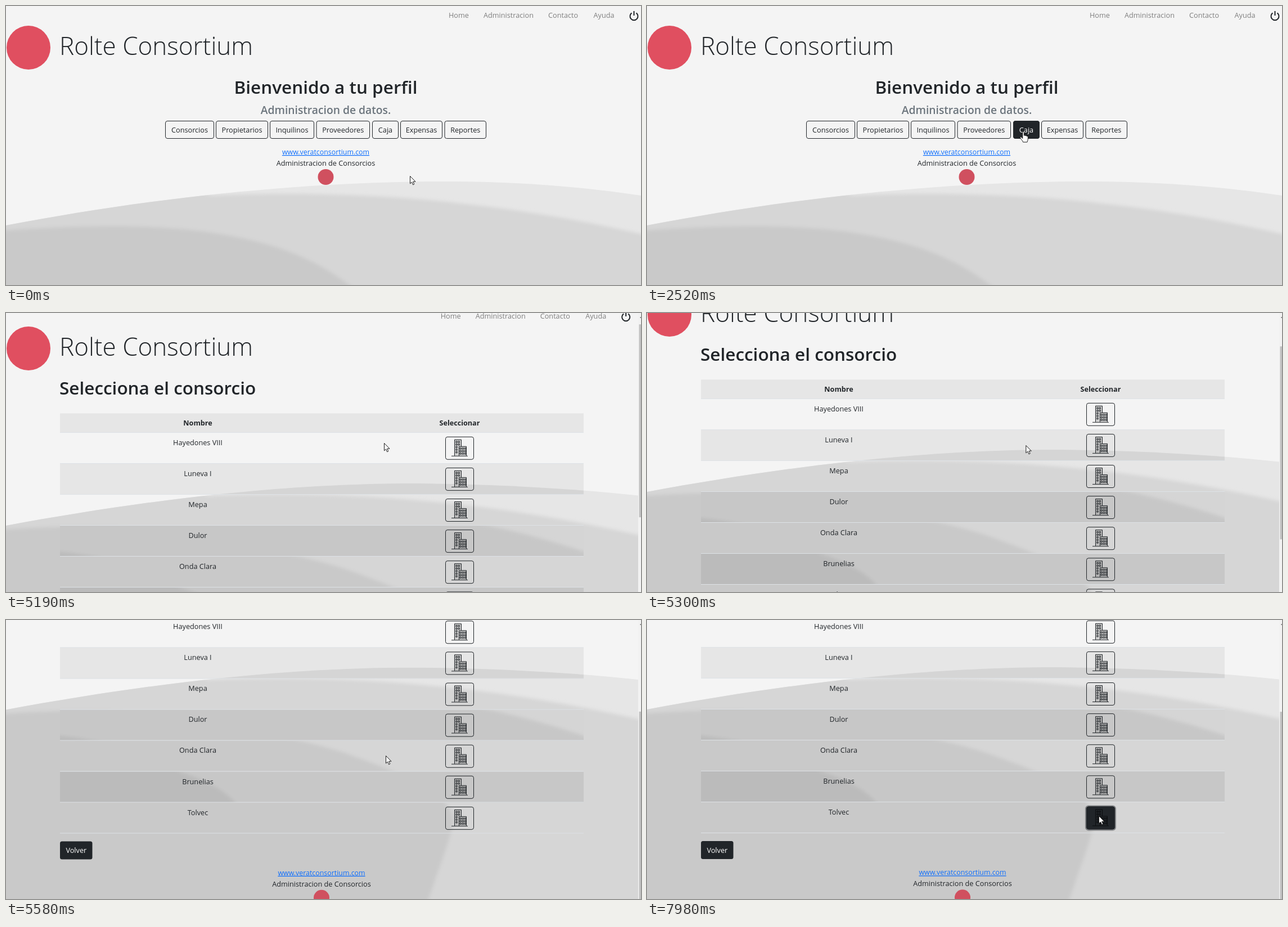
Animation of 1129 by 496 pixels, one loop 8000 ms. Source, as an HTML page:

```html
<!DOCTYPE html>
<html lang="es">
<head>
<meta charset="utf-8">
<title>Consorcios</title>
<style>
html, body { margin: 0; width: 100%; height: 100%; overflow: hidden; background: #f4f4f4; }
svg { display: block; width: 100vw; height: 100vh;
  --light: #e6e6e6; --mid: #d6d6d6; --dark: #c9c9c9; --rowHill: #d5d5d5; --rowMid: #c7c7c7; }
svg.flat { --mid: #cdcdcd; --dark: #cdcdcd; --rowHill: #cbcbcb; --rowMid: #cdcdcd; }
text { font: 12.7px "Open Sans", "Noto Sans", sans-serif; fill: #212529; }
.mid { text-anchor: middle; }
.nav { fill: #7f7f7f; }
.brand { font-size: 44px; font-weight: 300; }
.h1 { font-size: 31.5px; font-weight: 600; }
.sub { font-size: 19.3px; font-weight: 600; fill: #6c757d; }
.link { font-size: 12.4px; fill: #0d6efd; text-decoration: underline; }
.th { font-size: 12.6px; font-weight: 700; }
.on { fill: #fff; }
.btn { fill: none; stroke: #212529; }
.solid { fill: #212529; stroke: #212529; }
.ink { fill: none; stroke: #212529; }
.cursor { fill: #fff; stroke: #1b1b1b; stroke-linejoin: round; }
</style>
</head>
<body>
<svg id="stage" viewBox="0 0 1129 496" preserveAspectRatio="none"></svg>
<script>
const stage = document.getElementById('stage');
const LOOP = 8000;
const ROW = 55.1;
const names = ['Hayedones VIII', 'Luneva I', 'Mepa', 'Dulor', 'Onda Clara', 'Brunelias', 'Tolvec'];
const rowY = i => 223.5 + ROW * i;

const text = (x, y, s, cls = '') => `<text x="${x}" y="${y}" class="${cls}">${s}</text>`;
const rect = (x, y, w, h, extra) => `<rect x="${x}" y="${y}" width="${w}" height="${h}" ${extra}/>`;
const fill = (d, color) => `<path d="${d}" fill="${color}"/>`;

// Hill silhouette with softly edged darker bands inside.
const hills = (clip, base, mid, midColor, dark, darkColor) => `
  <g clip-path="url(#${clip})">
    ${rect(0, 290, 1129, 460, `fill="${base}"`)}
    <g filter="url(#soft)">${fill(mid, midColor)}${fill(dark, darkColor)}</g>
  </g>`;

const header = dx => {
  const items = [[787, 'Home'], [849, 'Administracion'], [964, 'Contacto'], [1044.5, 'Ayuda']];
  return items.map(([x, s]) => text(x + dx, 21, s, 'nav')).join('') +
    `<path class="ink" stroke-width="2" transform="translate(${1116.5 + dx} 18)"
      d="M-4-5.6A7 7 0 1 0 4-5.6M0-9V-1"/>
    <circle cx="40" cy="74" r="39" fill="#e04f60"/>` +
    text(95, 87, 'Rolte Consortium', 'brand');
};

const footer = (x, y) =>
  text(x, y, 'www.veratconsortium.com', 'link mid') +
  text(x, y + 20, 'Administracion de Consorcios', 'mid') +
  `<circle cx="${x}" cy="${y + 40}" r="14" fill="#d0505f"/>`;

const button = (x, w, s, on) =>
  rect(x + .5, 204.5, w - 1, 31, `rx="3.5" class="${on ? 'solid' : 'btn'}"`) +
  text(x + w / 2, 224.6, s, on ? 'mid on' : 'mid');

const windows = (x, y, cols, rows) => {
  let d = '';
  for (let r = 0; r < rows; r++)
    for (let c = 0; c < cols; c++) d += `M${x + c * 4.2} ${y + r * 4.6}h2.4v2.4h-2.4z`;
  return d;
};
const buildingPath = `M16.5 34V5.5H28.5V17.5M24.5 34V17.5H37.5V34M11 34.5H40` +
  windows(18.8, 8.2, 2, 2) + windows(18.8, 17.4, 1, 3) + windows(26, 20, 3, 2) + windows(26, 29, 3, 1);
const building = i => `<g transform="translate(781 ${rowY(i) + 7.3})">
  ${rect(.5, .5, 50, 40, 'rx="3.5" class="btn"')}
  <path d="M16 5h13v12h9v17H16z" fill="#888" opacity=".35"/>
  <path class="ink" d="${buildingPath}"/></g>`;

const homeMid = 'M-40 300H250L365 337C520 330 680 336 800 350C920 363 1040 383 1170 415V540H-40Z';
const homeDark = 'M-40 402C130 388 260 388 360 402C480 420 570 450 660 540H-40Z';
const listMid = 'M-40 300H250L360 336C500 330 640 336 720 343C860 354 1010 378 1170 416V780H-40Z';
const listDark = 'M-40 400C60 388 200 388 280 400C400 416 520 440 600 465C700 500 800 540 795 590C785 640 760 690 735 780H-40Z';
const rowMid = 'M-40 360H700C860 385 960 410 1070 450V780H-40Z';
const rowDark = 'M-40 425C150 432 260 460 310 499C400 530 420 560 430 600H-40Z';

const stripes = rect(96, 189.5, 931, 34, '') +
  [1, 3, 5].map(i => rect(96, rowY(i), 931, ROW, '')).join('');

const menu = [[283, 87, 'Consorcios'], [373, 93, 'Propietarios'], [469, 79, 'Inquilinos'],
  [551.5, 95.5, 'Proveedores'], [651, 47, 'Caja'], [701, 75, 'Expensas'], [779.5, 74.5, 'Reportes']];

stage.innerHTML = `
  <defs>
    <filter id="soft"><feGaussianBlur stdDeviation="3"/></filter>
    <clipPath id="homeHill"><path d="M0 390C270 339 530 312 790 312C910 312 1020 321 1129 337V496H0Z"/></clipPath>
    <clipPath id="listHill"><path d="M0 389C240 345 470 316 705 314C850 314 1000 322 1129 336V760H0Z"/></clipPath>
    <clipPath id="stripes">${stripes}</clipPath>
  </defs>
  ${rect(0, 0, 1129, 496, 'fill="#f4f4f4"')}
  <g id="home">
    ${hills('homeHill', 'var(--light)', homeMid, 'var(--mid)', homeDark, 'var(--dark)')}
    ${header(0)}
    ${text(568.5, 156, 'Bienvenido a tu perfil', 'h1 mid')}
    ${text(568.5, 192, 'Administracion de datos.', 'sub mid')}
    ${menu.map(b => button(...b)).join('')}
    <g id="cajaOn">${button(...menu[4], true)}</g>
    ${footer(568.5, 264)}
  </g>
  <g id="list">
    <g id="page">
      ${hills('listHill', 'var(--light)', listMid, 'var(--mid)', listDark, 'var(--dark)')}
      <g clip-path="url(#stripes)">
        ${rect(96, 180, 931, 440, 'fill="#e6e6e6"')}
        ${hills('listHill', 'var(--rowHill)', rowMid, 'var(--rowMid)', rowDark, '#bbb')}
      </g>
      ${header(-14.3)}
      ${text(95, 156, 'Selecciona el consorcio', 'h1')}
      ${text(341, 211.3, 'Nombre', 'th mid')}
      ${text(806.5, 211.3, 'Seleccionar', 'th mid')}
      ${names.map((n, i) => text(341, rowY(i) + 22, n, 'mid') + building(i)).join('')}
      ${[0, 1, 2, 3, 4, 5, 6, 7].map(i => rect(96, Math.round(rowY(i)) - 1, 931, 1, 'fill="#dee2e6"')).join('')}
      <g id="pickOn" transform="translate(781 ${rowY(6) + 7.3})">
        ${rect(-1, -1, 53, 43, 'id="ring" rx="5" fill="none" stroke="#212529" stroke-opacity=".45" stroke-width="2"')}
        ${rect(.5, .5, 50, 40, 'rx="3.5" class="solid"')}
        <path d="${buildingPath}" fill="none" stroke="#0b0d0f"/>
      </g>
      ${rect(96, 623, 57.5, 32, 'rx="3.5" fill="#212529"')}
      ${text(124.8, 643.8, 'Volver', 'mid on')}
      ${footer(561, 683.3)}
    </g>
    ${rect(1124, 0, 5, 496, 'fill="#f2f2f2"')}
    ${rect(1127.5, 7, 1.5, 2, 'fill="#777"')}
    ${rect(1125.5, 13, 3.5, 343, 'id="thumb" fill="#c1c1c1"')}
  </g>
  <path id="arrow" class="cursor" d="M.5 .5V13.8L3.5 11 5.6 15.8 7.8 14.8 5.7 10.2H10Z"/>
  <path id="hand" class="cursor" d="M-1.2 1.3a1.3 1.3 0 0 1 2.6 0V7.3c.8-.7 2.2-.5 2.5.5.8-.6 2.1-.3 2.4.7 1-.4 2 .2 2 1.4V14c0 2-1.2 3-1.4 5H-.4C-.8 17-3.8 14-5.3 11.6-6 10.4-4.6 9.2-3.4 10.2L-1.2 12.4Z"/>`;

const el = id => document.getElementById(id);
const set = (id, name, value) => el(id).setAttribute(name, value);

// Pointer hot spot: time, x, y
const path = [
  [440, 718, 302], [1280, 682, 238], [1520, 679, 230], [1880, 669, 223],
  [3860, 669, 223], [3980, 671, 224], [5120, 671, 224], [5180, 672, 231],
  [5360, 674, 237], [5540, 675, 241], [5780, 675, 241], [5960, 618, 276],
  [6200, 430, 318], [6380, 312, 332], [6560, 341, 334], [6740, 430, 343],
  [7100, 640, 350], [7400, 800, 348], [7460, 803, 348]
];
const scrollSteps = [[5190, 11], [5240, 38], [5290, 71], [5340, 103], [5390, 133],
  [5440, 163], [5490, 190], [5530, 212], [5580, 229.5], [5620, 230]];

const ramp = (t, from, to) => Math.min(1, Math.max(0, (t - from) / (to - from)));

function pointer(t) {
  const held = t - (t - 20 + 60) % 60;
  const next = path.findIndex(p => p[0] > held);
  if (next === 0) return path[0].slice(1);
  if (next < 0) return path[path.length - 1].slice(1);
  const a = path[next - 1], b = path[next], k = ramp(held, a[0], b[0]);
  return [a[1] + (b[1] - a[1]) * k, a[2] + (b[2] - a[2]) * k];
}

function draw(t) {
  const onList = t >= 3680;
  const scroll = scrollSteps.reduce((s, [at, y]) => t >= at ? y : s, 0);
  const [x, y] = pointer(t);
  const hand = t >= 1350 && !onList;
  const show = (id, on) => set(id, 'display', on ? 'inline' : 'none');

  show('home', !onList);
  show('list', onList);
  stage.classList.toggle('flat', t >= 5340 && t < 5490);
  set('page', 'transform', `translate(0 ${-scroll})`);
  set('thumb', 'y', 13 + scroll * .653);
  set('cajaOn', 'opacity', ramp(t, 1630, 1810));
  set('pickOn', 'opacity', ramp(t, 7400, 7600));
  show('ring', t >= 7920);
  show('arrow', !hand);
  show('hand', hand);
  set(hand ? 'hand' : 'arrow', 'transform', `translate(${x} ${y})`);
}

const start = performance.now();
function tick() {
  draw((performance.now() - start) % LOOP);
  requestAnimationFrame(tick);
}
tick();
</script>
</body>
</html>
```
